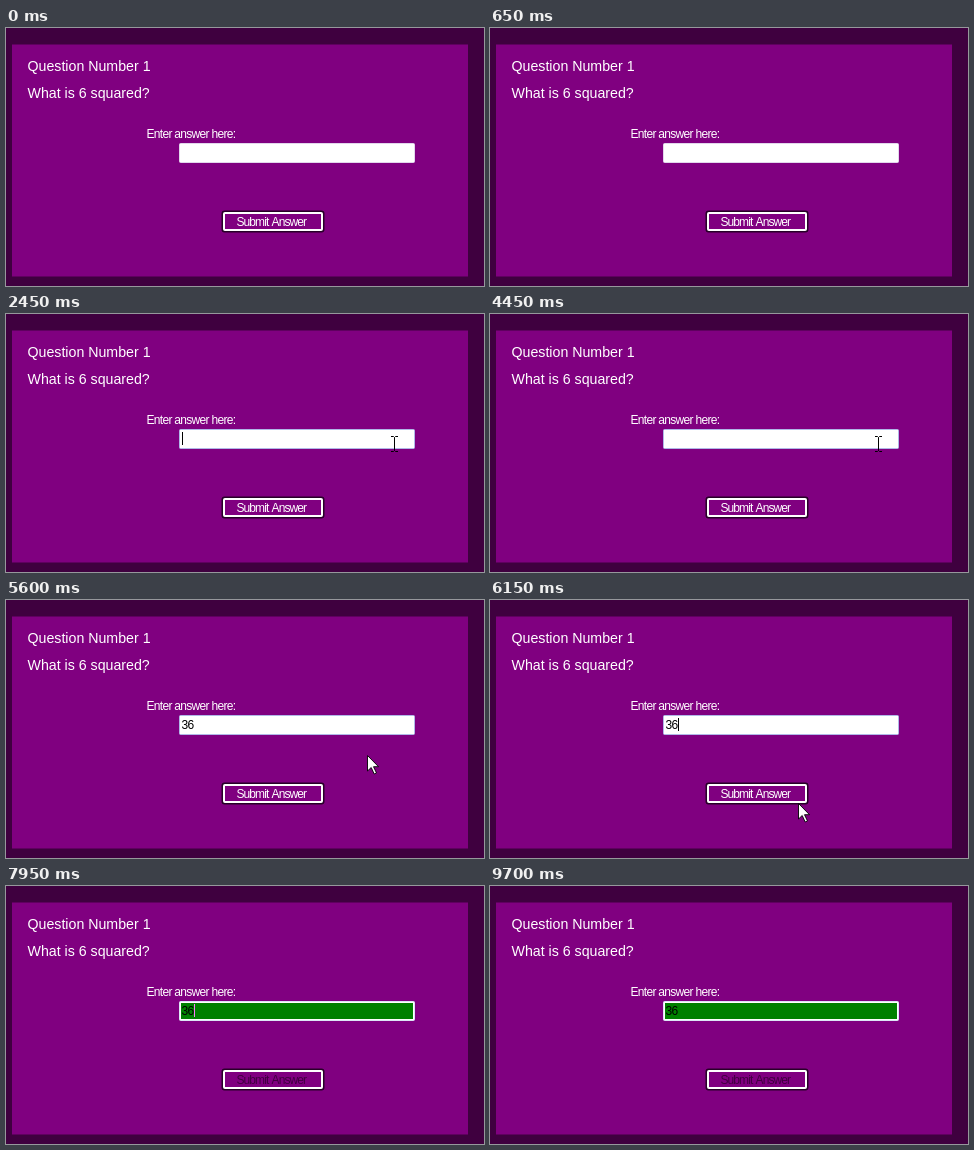
An HTML page that plays this animation: 478x258 px, repeating every 9.95 s.

```html
<!DOCTYPE html>
<html lang="en">
<head>
<meta charset="utf-8">
<title>Quiz question</title>
<style>
  html, body { margin: 0; width: 100%; height: 100%; overflow: hidden; background: #3f003f; }
  svg { display: block; width: 478px; height: 258px; }
  text { font-family: "Liberation Sans", Arial, sans-serif; fill: #fff; }
  .heading { font-size: 14.2px; }
  .small { font-size: 12px; letter-spacing: -.7px; }
  #caption { letter-spacing: -.92px; word-spacing: 1.5px; }
  #answer { fill: #000; }
</style>
</head>
<body>
<svg viewBox="0 0 478 258">
  <rect width="478" height="258" fill="#3f003f"/>
  <rect x="6" y="16.5" width="456" height="232" fill="#800080"/>
  <text class="heading" x="21.5" y="43">Question Number 1</text>
  <text class="heading" x="21.5" y="70">What is 6 squared?</text>
  <text class="small" x="140.5" y="110">Enter answer here:</text>

  <rect id="frame" x="173.5" y="115.5" width="235" height="19" rx="1" fill="#fff"/>
  <rect id="fill" x="175" y="117" width="232" height="16"/>
  <text id="answer" class="small" x="175.5" y="129"></text>
  <rect id="caret" y="118" width="1" height="13"/>

  <rect x="216.5" y="183.5" width="101" height="20" rx="2" fill="none" stroke="#280028" stroke-width="2"/>
  <rect x="218" y="185" width="98" height="17" rx="1" fill="none" stroke="#fff" stroke-width="2"/>
  <text id="caption" class="small" x="230.5" y="198">Submit Answer</text>

  <path id="arrow" d="M.5 .5V16l3.7-3.5 3 6.5 2.3-1-3-6.3h5z" fill="#fff" stroke="#000" stroke-width=".9"/>
  <path id="beam" d="M-3.5-7.5H-1L0-6.5 1-7.5H3.5M0-6.5V6.5M-3.5 7.5H-1L0 6.5 1 7.5H3.5" fill="none" stroke="#000"/>
</svg>
<script>
const LOOP = 9950, BLINK = 530;
const FOCUS = 2400, KEYS = [4600, 4850], PRESS = 6500, RESULT = 7950;
const ENTER = { from: 1150, to: 7250, x: 458, y: 235 };
const MOVES = [
  { start: 1150, end: 1450, x: 443, y: 211 },
  { start: 1600, end: FOCUS, x: 388, y: 130 },
  { start: 5250, end: 6150, x: 308, y: 203 },
  { start: 6200, end: PRESS, x: 290, y: 190 },
  { start: 6600, end: 7250, x: 478, y: 221 }
];

const $ = id => document.getElementById(id);
const set = (id, attrs) => {
  for (const name in attrs) $(id).setAttribute(name, attrs[name]);
};
const show = (id, on) => set(id, { visibility: on ? "visible" : "hidden" });
const ease = k => k * k * (3 - 2 * k);

function pointerAt(t) {
  let { x, y } = ENTER;
  for (const move of MOVES) {
    const k = ease(Math.min(1, Math.max(0, (t - move.start) / (move.end - move.start))));
    x += (move.x - x) * k;
    y += (move.y - y) * k;
  }
  return { x: Math.round(x), y: Math.round(y) };
}

// Focus and typing restart the blink.
function caretOn(t, focused) {
  const restart = [FOCUS, ...KEYS, RESULT].filter(time => time <= t).pop();
  return focused && (t - restart) % (2 * BLINK) < BLINK;
}

function render(time) {
  const t = Math.floor(time % LOOP / 50) * 50;
  const typed = KEYS.filter(key => t >= key).length;
  const done = t >= RESULT;
  const focused = done || (t >= FOCUS && t < PRESS);

  set("frame", { stroke: done ? "#dce6f6" : focused ? "#b0b8e8" : "#e2d6ec" });
  set("fill", { fill: done ? "#008000" : "#fff" });
  set("caption", { style: "fill:" + (done ? "#400040" : "#fff") });
  $("answer").textContent = "36".slice(0, typed);
  set("caret", { x: 176 + typed * 6, fill: done ? "#ff7fff" : "#000" });
  show("caret", caretOn(t, focused));

  const { x, y } = pointerAt(t);
  const visible = t >= ENTER.from && t < ENTER.to;
  const inField = x > 173 && x < 409 && y > 115 && y < 135;
  show("arrow", visible && !inField);
  show("beam", visible && inField);
  set("arrow", { transform: `translate(${x} ${y})` });
  set("beam", { transform: `translate(${x + .5} ${y})` });
}

const start = performance.now();
function tick() {
  render(performance.now() - start);
  requestAnimationFrame(tick);
}
tick();
</script>
</body>
</html>
```
